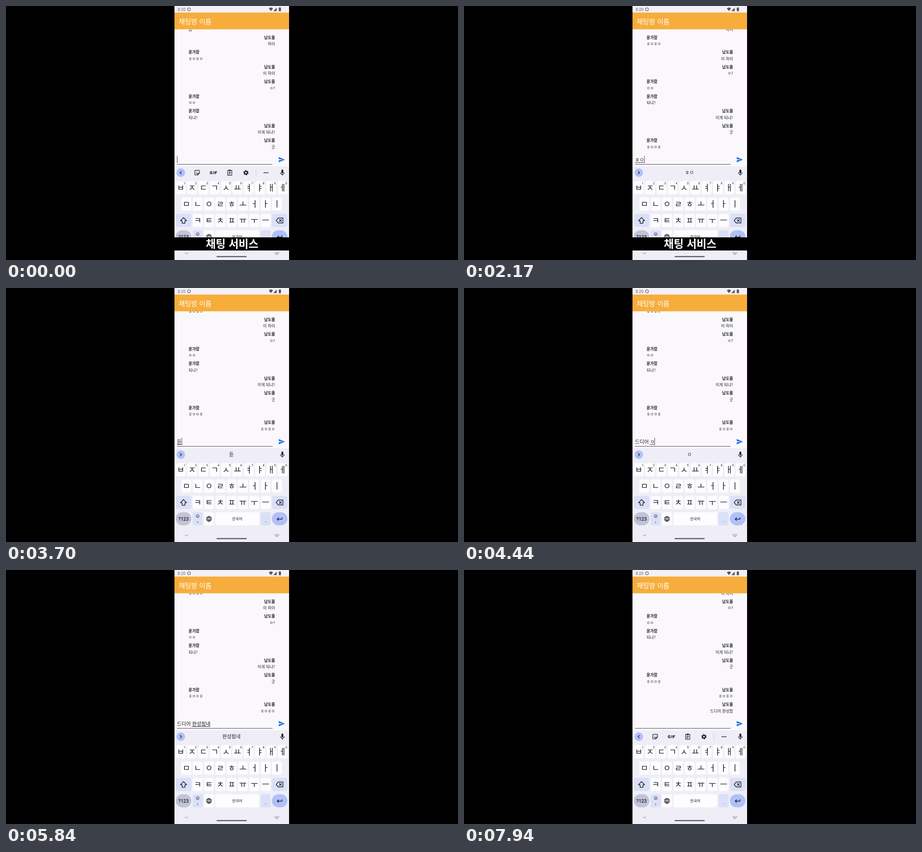
Write an HTML page that moves like this. It is 998 px wide and 561 px high and loops after 8 s.

```html
<!DOCTYPE html>
<html lang="ko">
<head>
<meta charset="utf-8">
<title>채팅방</title>
<style>
  html, body { margin: 0; width: 100%; height: 100%; overflow: hidden; background: #000; }
  svg { display: block; width: 998px; height: 561px; }
  text { font-family: 'Noto Sans CJK KR', 'Noto Sans CJK', sans-serif; white-space: pre; }
  .lat { font-family: Roboto, sans-serif; }
  .mid { text-anchor: middle; }
  .line { fill: none; stroke: #1c1d24; stroke-width: 1.4; stroke-linejoin: round; }
</style>
</head>
<body>
<svg viewBox="0 0 998 561" xmlns="http://www.w3.org/2000/svg">
  <defs><clipPath id="listClip"><rect x="372" y="51.5" width="253" height="275"/></clipPath></defs>
  <rect width="998" height="561"/>
  <rect x="372" width="253" height="561" fill="#fbf8fd"/>
  <g clip-path="url(#listClip)"><g id="list"></g></g>
  <g id="status"></g>
  <rect x="372" y="14.5" width="253" height="37" fill="#f6ad3b"/>
  <text x="381.5" y="40.4" font-size="14.8" font-weight="500" fill="#fff">채팅방 이름</text>
  <g id="field">
    <rect x="377.5" y="349" width="211" height="1.3" fill="#6b6678"/>
    <text id="typed" x="377.5" y="343.6" font-size="11" fill="#1c1b1f"></text>
    <rect id="under" y="345.3" height=".9" fill="#1c1b1f"/>
    <rect id="caret" y="331" width="1.1" height="16" fill="#4b4561"/>
  </g>
  <rect x="372" y="354" width="253" height="207" fill="#efeef7"/>
  <g id="keys"></g>
  <circle cx="386" cy="368" r="9.4" fill="#b0c1fa"/>
  <path id="chevron" class="line" stroke-linecap="round"/>
  <g id="tools"></g>
  <g id="hints" fill="#1c1d24" class="mid" font-size="10.9">
    <text id="hintL" x="430" y="372.3"></text>
    <text id="hintM" x="497.7" y="372.3"></text>
    <text id="hintR" x="565" y="372.3"></text>
    <path id="bars" d="M462 360v16M533.5 360v16" stroke="#c9cad6" stroke-width="1"/>
  </g>
  <g id="nav"></g>
  <g id="caption">
    <rect x="372" y="511" width="253" height="29"/>
    <text class="mid" x="499.3" y="533.6" font-size="23.8" font-weight="700" fill="#fff">채팅 서비스</text>
  </g>
</svg>
<script>
const LOOP = 8000, BLINK = 250, ROW = 32.5, SCROLL = 120;
const INK = '#1c1d24';
const $ = id => document.getElementById(id);

const me = '남도율', friend = '윤가람';
const messages = [
  [friend, '음'], [me, '하이'], [friend, 'ㅎㅇㅎㅇ'], [me, '이 하이'], [me, 'ㅇ?'],
  [friend, 'ㅇㅇ'], [friend, '되냐?'], [me, '이게 되냐?'], [me, '굿'],
  [friend, 'ㅎㅇㅇㅎ'], [me, 'ㅎㅇㅎㅇ'], [me, '드디어 완성함'],
];
const arrivals = [500, 2740, 7560];

// time, committed text, composing text
const edits = [
  [-200, '', ''], [1240, '', 'ㅇ'], [1620, '', ''],
  [1740, '', 'ㅎ'], [1990, '', 'ㅎㅇ'], [2260, '', 'ㅎㅇㅎ'], [2520, '', 'ㅎㅇㅎㅇ'], [2740, '', ''],
  [3350, '', 'ㄷ'], [3480, '', '드'], [3620, '', '듣'], [3760, '', '드디'],
  [3900, '', '드딩'], [4040, '', '드디어'], [4200, '드디어 ', ''],
  [4400, '드디어 ', 'ㅇ'], [4510, '드디어 ', '오'], [4600, '드디어 ', '와'], [4690, '드디어 ', '완'],
  [4770, '드디어 ', '완ㅅ'], [4850, '드디어 ', '완서'], [4930, '드디어 ', '완성'],
  [5010, '드디어 ', '완성ㄷ'], [5080, '드디어 ', '완성도'], [5310, '드디어 ', '완성되'],
  [5410, '드디어 ', '완성됬'], [5490, '드디어 ', '완성됬ㄴ'], [5570, '드디어 ', '완성됬네'],
  [6070, '드디어 ', '완성됬ㄴ'], [6150, '드디어 ', '완성됬'], [6220, '드디어 ', '완성되'],
  [6290, '드디어 ', '완성도'], [6350, '드디어 ', '완성ㄷ'], [6420, '드디어 ', '완성'],
  [6530, '드디어 ', '완성ㅎ'], [6640, '드디어 ', '완성하'], [6740, '드디어 ', '완성함'],
  [7560, '', ''],
];

const rect = (x, y, w, h, r, fill) =>
  `<rect x="${x}" y="${y}" width="${w}" height="${h}" rx="${r}" fill="${fill}"/>`;
const label = (x, y, size, s, extra = 'class="mid"') =>
  `<text x="${x}" y="${y}" font-size="${size}" fill="${INK}" ${extra}>${s}</text>`;
const icon = (x, y, scale, d, fill = INK) =>
  `<path transform="translate(${x} ${y}) scale(${scale}) translate(-12 -12)" d="${d}" fill="${fill}"/>`;
const line = (d, extra = '') => `<path class="line" d="${d}" ${extra}/>`;

function buildList() {
  $('list').innerHTML = messages.map(([who, s], i) => {
    const mine = who === me, x = mine ? 594 : 403;
    const at = `text-anchor="${mine ? 'end' : 'start'}"`;
    return `<g>${label(x, i * ROW + 3.1, 8.7, who, at + ' font-weight="700"')}` +
      `${label(x, i * ROW + 17.7, 8.7, s, at)}</g>`;
  }).join('');
}

function buildStatus() {
  const grey = '#55565c';
  $('status').innerHTML = rect(372, 0, 253, 14.5, 0, '#f3f0f6') +
    `<text class="lat" x="379" y="10.8" font-size="8.9" fill="#66676c">8:20</text>` +
    `<circle cx="404" cy="7.3" r="3.2" fill="none" stroke="#66676c" stroke-width="1.3"/>` +
    `<path d="M580.3 5.2Q585 1.4 589.7 5.2L585 11.2zM590.3 11.2h7.4V3.6z" fill="${grey}"/>` +
    rect(602.3, 3.8, 4.8, 7.8, .8, grey) + rect(603.6, 2.8, 2.2, 1.5, 0, grey);
}

function buildKeys() {
  const white = '#fdfcfe', blue = '#dae0f8';
  let s = '';
  const row = (chars, x, cy) => [...chars].forEach((c, i) => {
    const cx = x + i * 25;
    s += rect(cx - 10.9, cy - 14.5, 21.8, 29, 4, white) + label(cx, cy + 6.7, 18, c);
  });
  row('ㅂㅈㄷㄱㅅㅛㅕㅑㅐㅔ', 385.8, 401.3);
  row('ㅁㄴㅇㄹㅎㅗㅓㅏㅣ', 398.2, 437.4);
  row('ㅋㅌㅊㅍㅠㅜㅡ', 423.2, 473.7);
  [...'1234567890'].forEach((c, i) => s += label(394.2 + i * 24.95, 394.3, 6.4, c, 'class="lat mid"'));

  s += rect(375, 459.2, 34.3, 29, 4.5, blue) + rect(587, 459.2, 34.3, 29, 4.5, blue);
  s += line('M392 467.3l-6.8 7h3.6v5.4h6.4v-5.4h3.6z');
  s += line('M601 468.3h10.5v11H601l-4.5-5.5zM603 471l5.6 5.6m0-5.6l-5.6 5.6');

  s += rect(375, 495.3, 34.3, 29, 14.5, '#c1c4d7') + rect(412.3, 495.3, 21.8, 29, 4, blue) +
    rect(437.3, 495.3, 21.8, 29, 4, white) + rect(462.2, 495.3, 96.8, 29, 4, white) +
    rect(562.2, 495.3, 21.8, 29, 4, blue) + rect(587, 495.3, 34.3, 29, 14.5, '#b0c1fa');
  s += label(392, 513.7, 10.4, '?123', 'class="lat mid" font-weight="500"');
  s += label(423.2, 517, 12, ',', 'class="lat mid"') + label(573, 517, 12, '.', 'class="lat mid"');
  s += label(510.6, 513, 8.2, '한국어');
  s += line('M426.4 503.8a3.2 3.2 0 1 1-6.4 0a3.2 3.2 0 1 1 6.4 0M421.6 504.6q1.6 1.8 3.2 0M421.9 502.8h.7m1.2 0h.7',
    'style="stroke-width:.8"');
  s += line('M453.7 509.8a5.6 5.6 0 1 1-11.2 0a5.6 5.6 0 1 1 11.2 0M442.9 507.8h10.4M442.9 511.8h10.4' +
    'M448.1 504.2q-5 5.6 0 11.2q5-5.6 0-11.2', 'style="stroke-width:1.1"');
  s += line('M609.4 506.5v4h-10.6m3.4-3.4l-3.4 3.4l3.4 3.4');

  const mic = 'M12 14c1.7 0 3-1.3 3-3V5a3 3 0 0 0-6 0v6c0 1.7 1.3 3 3 3zm5-3a5 5 0 0 1-10 0H5c0 3.5 2.6 6.4 6 6.9V21h2v-3.1c3.4-.5 6-3.4 6-6.9z';
  s += icon(610.2, 368.3, .7, mic);
  $('keys').innerHTML = s;
  $('field').insertAdjacentHTML('beforeend',
    icon(608.7, 339.4, .65, 'M2 21L23 12 2 3v7l15 2-15 2z', '#1a6fe0'));
}

function buildTools() {
  let s = line('M418 362.8h8q1.2 0 1.2 1.2v5.4l-3.8 3.8H418q-1.2 0-1.2-1.2v-8q0-1.2 1.2-1.2z' +
    'M427 369.3h-2.6q-1 0-1 1v2.7M419.5 368.7q1.3 2 3.2 1.2M419.5 366h1m3 0h1', 'style="stroke-width:1.2"');
  s += line('M455.6 365.7h-3q-1.4 0-1.4 1.2v2.4q0 1.2 1.4 1.2h2.4v-2.2h-1.6M458.8 365v6.2M462 371.2v-5.5h4M462 368.5h3.2',
    'style="stroke-width:1.6"');
  s += line('M489.4 363.2h9.2v10.6h-9.2zM491.6 366.8h4.8m-4.8 2.2h4.8m-4.8 2.2h3.2', 'style="stroke-width:1.2"') +
    rect(491.6, 361.6, 4.8, 3, 1, INK);
  s += `<circle cx="529.8" cy="368.2" r="3.1" fill="none" stroke="${INK}" stroke-width="2.4"/>` +
    `<circle cx="529.8" cy="368.2" r="4.7" fill="none" stroke="${INK}" stroke-width="2" stroke-dasharray="2.7 2.22"/>`;
  s += rect(551.5, 360, 1, 16, 0, '#cfd0da');
  for (const x of [570.2, 574, 577.8]) s += `<circle cx="${x}" cy="368.2" r="1.25" fill="${INK}"/>`;
  $('tools').innerHTML = s;
}

function buildNav() {
  const grey = 'style="stroke:#66676d;stroke-width:1"';
  $('nav').innerHTML = line('M395.4 545l3 3l3-3', grey) + rect(465, 552.2, 66.5, 2.5, 1.2, '#5c5c61') +
    line('M593 544.2h10M593 546.4h10', grey + ' stroke-dasharray="1.3 .9"') +
    line('M595.5 548.6h5', grey);
}

const textWidth = s => [...s].reduce((w, c) => w + (c === ' ' ? 2.46 : 10.12), 0);
const clamp = v => Math.max(0, Math.min(1, v));
const ease = v => 1 - (1 - v) ** 2;
const show = (el, on) => el.setAttribute('display', on ? 'inline' : 'none');

function render(t) {
  const last = arrivals.reduce((p, at) => p + ease(clamp((t - at) / SCROLL)), 8);
  $('list').setAttribute('transform', `translate(0 ${297 - ROW * last})`);
  [...$('list').children].forEach((g, i) => g.setAttribute('opacity', clamp(last - i + 1)));

  const [at, done, word] = edits.filter(e => e[0] <= t).pop();
  const start = 377.5 + textWidth(done), end = start + textWidth(word);
  $('typed').textContent = done + word;
  $('under').setAttribute('x', start);
  $('under').setAttribute('width', end - start);
  $('caret').setAttribute('x', end);
  show($('caret'), Math.floor((t - at) / BLINK) % 2 === 0);

  const typing = word !== '', choice = word === '완성함';
  show($('tools'), !typing);
  show($('hints'), typing);
  show($('bars'), choice);
  $('hintL').textContent = choice ? '완성함' : '';
  $('hintM').textContent = choice ? '완성한' : word;
  $('hintR').textContent = choice ? '완성할' : '';
  $('hintM').setAttribute('font-weight', choice ? 700 : 400);
  $('chevron').setAttribute('d', typing ? 'M384.8 365.2l2.9 2.9l-2.9 2.9' : 'M387.2 365.2l-2.9 2.9l2.9 2.9');

  show($('caption'), t < 2270);
}

function tick() {
  render(performance.now() % LOOP);
  requestAnimationFrame(tick);
}

buildList();
buildStatus();
buildKeys();
buildTools();
buildNav();
tick();
</script>
</body>
</html>
```
